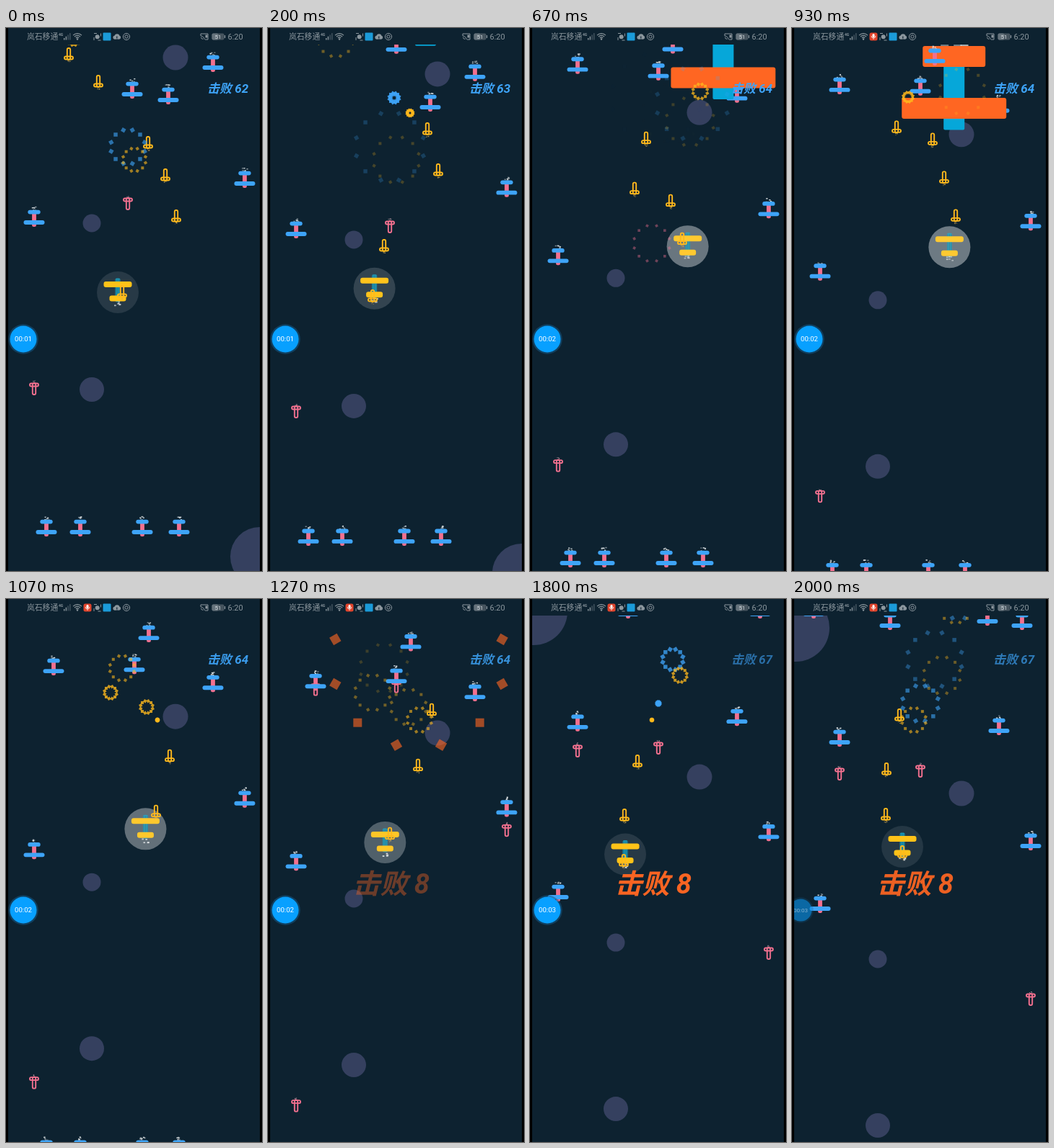
Recreate the animation shown at these times as an HTML page with a canvas. Size 355 by 754 pixels, loop 2.07 s.

```html
<!DOCTYPE html>
<html lang="zh">
<head>
<meta charset="utf-8">
<style>
html, body { margin: 0; width: 100%; height: 100%; overflow: hidden; background: #000; }
canvas { display: block; }
</style>
</head>
<body>
<canvas id="stage" width="355" height="754"></canvas>
<script>
const g = document.getElementById('stage').getContext('2d');
const LOOP = 2070, TOP = 23;
const BG = '#0d2230', BLUE = '#3ea4f8', PINK = '#f2708f', YELLOW = '#ffb91c',
  ORANGE = '#ff6622', CYAN = '#06a7d9', PURPLE = '#35405f', GREY = '#8c979e';
const FONT = 'Roboto, "Noto Sans CJK SC", "Noto Sans CJK", sans-serif';

// Player: time, x, y, shield opacity
const flight = [
  [0, 155, 367, .1], [190, 145, 364, .14], [390, 197, 318, .25], [400, 201, 317, .26],
  [590, 211, 306, .36], [670, 219, 303, .38], [790, 225, 302, .4], [930, 219, 304, .4],
  [990, 208, 309, .38], [1190, 170, 336, .3], [1270, 162, 338, .27], [1390, 149, 345, .22],
  [1600, 131, 355, .14], [1790, 131, 355, .1], [2000, 153, 344, .09]];

// Drifting discs: x, y at start, radius
const discs = [[235, 41, 17.5], [119, 271, 12.5], [119, 502, 17], [352, 734, 41], [5, -189, 47]];

// Enemy planes: x, wing y at start, speed, end time
const early = [
  [39, 270, .08], [331, 216, .0635], [287, 55, .064], [175, 92, .05, 150], [225, 100, .05, 250],
  [56, 700, .0645], [103, 700, .0645], [189, 700, .0645], [240, 700, .0645]];
const late = [
  [66, -13, .106], [178, 14, .079, 1790], [198, -11.5, .0615, 1680],
  [136, -123, .08], [319, -123, .08], [271, -129, .08], [30, -139, .08]];

// Player shots: x, y at start, birth, end
const shots = [
  [87, 37], [128, 75], [197, 160, 0, 150], [221, 205, 0, 250], [236, 262, 0, 540],
  [161, 367, 0, 851], [145, 437, 190, 960], [195, 454, 390, 960], [211, 507, 590, 1055],
  [227, 560, 790, 1720], [208, 637, 990, 1680], [169, 732, 1190, 1790], [149, 802, 1390],
  [131, 877, 1590], [130, 940, 1790], [153, 992, 1990]];

// Enemy shots: x, y at start, speed, birth, end
const darts = [[169, 243, .16, 0, 360], [39, 500, .16], [66, -78, .16, 1190],
  [178, -82, .16, 1190], [331, -85, .32, 1190]];

// Bursts by colour: square size, spread speed, then x, y, start
const bursts = [
  [BLUE, 5.5, .12, [[169, 165, -200], [175, 97, 150], [225, 105, 250],
    [198, 84, 1680], [231, -6, 1720], [178, 145, 1790]]],
  [YELLOW, 4, .08, [[94, 15, -110], [178, 183, -200], [197, 118, 150], [222, 130, 250],
    [236, 88, 540], [161, 96, 851], [145, 130, 960], [195, 150, 960], [210, 168, 1055],
    [208, 106, 1680], [227, 11, 1720], [169, 168, 1790]]],
  [PINK, 3.6, .085, [[169, 299, 370]]],
  [ORANGE, 12, .6, [[209, 87, 1067]]]];

const alive = (t, from = 0, to = Infinity) => t >= from && t < to;

function at(rows, t) {
  const i = rows.findIndex(r => r[0] > t);
  if (i < 0) return rows[rows.length - 1].slice(1);
  if (!i) return rows[0].slice(1);
  const a = rows[i - 1], b = rows[i], p = (t - a[0]) / (b[0] - a[0]);
  return a.slice(1).map((v, j) => v + (b[j + 1] - v) * p);
}

function disc(x, y, r, color) {
  g.fillStyle = color;
  g.beginPath();
  g.arc(x, y, r, 0, 7);
  g.fill();
}

// Rounded bar centred on x, y
function bar(x, y, w, h, color, r = 3) {
  g.fillStyle = color;
  g.beginPath();
  g.roundRect(x - w / 2, y - h / 2, w, h, r);
  g.fill();
}

function text(str, x, y, font, color, align = 'left') {
  g.font = font + ' ' + FONT;
  g.fillStyle = color;
  g.textAlign = align;
  g.fillText(str, x, y);
}

// Flickering propeller
function puff(x, y, s, frame, color = '#dde2e4') {
  let seed = frame * 37 + Math.round(x) * 11 + 5;
  const rnd = () => (seed = (seed * 16807 + 11) % 2147483647) / 2147483647;
  rnd(); rnd();
  g.fillStyle = color;
  for (let i = 0; i < 6; i++) {
    g.globalAlpha = .4 + .6 * rnd();
    g.fillRect(x + (rnd() * 7 - 4.5) * s, y + (rnd() * 5 - 3) * s, 2.2 * s, 1.5 * s);
  }
  g.globalAlpha = 1;
}

function plane(x, y, s, wing, body, frame) {
  puff(x, y - 19.3 * s, s, frame);
  bar(x, y - 5.5 * s, 5.8 * s, 23 * s, body, 2);
  bar(x, y - 14.4 * s, 17.4 * s, 5.8 * s, wing);
  bar(x, y, 29 * s, 5.8 * s, wing);
}

function dart(x, y, dir, color, frame) {
  puff(x, y + 9 * dir, .55, frame, dir > 0 ? '#d8ae55' : '#c9a3ae');
  g.strokeStyle = color;
  g.lineWidth = 1.9;
  g.beginPath();
  g.roundRect(x - 2.2, y - (dir > 0 ? 9 : 7), 4.4, 16, 2);
  g.roundRect(x - 6, y + 4.5 * dir - 2, 12, 4, 2);
  g.stroke();
}

function player(t, frame) {
  const [x, y, a] = at(flight, t);
  disc(x, y, 29, `rgba(255,255,255,${a * .75})`);
  bar(x, y - 3, 7, 33, '#128fb0', 2);
  g.fillStyle = 'rgba(13,34,48,.3)';
  for (let i = -1; i < 2; i++) g.fillRect(x + i * 2.4 - .4, y - 18, .9, 30);
  puff(x, y + 16, 1.2, frame);
  bar(x, y - 11, 39, 8, '#ffc010');
  bar(x, y + 8.5, 23, 8, '#ffc010');
  disc(x, y, 29, `rgba(255,255,255,${a * .35})`);
}

function burst(x, y, age, size, speed, color) {
  if (age < 0 || age > 520) return;
  g.globalAlpha = 1 - age / 520;
  g.fillStyle = color;
  for (let i = 0; i < 12; i++) {
    g.save();
    g.translate(x, y);
    g.rotate((i + .5) * Math.PI / 6);
    g.translate(age * speed, 0);
    g.rotate(Math.PI / 4);
    g.fillRect(-size / 2, -size / 2, size, size);
    g.restore();
  }
  g.globalAlpha = 1;
}

function statusBar(t) {
  text('岚石移通', 29, 16, '10.8px', GREY);
  text('4G', 73, 11, 'bold 5px', GREY);
  for (let i = 0; i < 4; i++) {
    g.globalAlpha = i < 2 ? 1 : .45;
    g.fillStyle = GREY;
    g.fillRect(80 + i * 2.7, 14 - i * 2.3, 1.4, 2.5 + i * 2.3);
  }
  g.globalAlpha = 1;
  g.strokeStyle = GREY;
  g.lineWidth = 1.2;
  for (const r of [3, 5.7, 8.4]) {
    g.beginPath();
    g.arc(99, 16, r, -Math.PI * .75, -Math.PI * .25);
    g.stroke();
  }
  disc(99, 15.5, 1.2, GREY);
  if (t >= 800) {
    bar(113, 12, 11, 11, '#e0442c', 2.5);
    bar(113, 10.5, 3, 5, '#fff', 1.5);
    g.strokeStyle = '#fff';
    g.lineWidth = .8;
    g.beginPath();
    g.arc(113, 11, 2.9, 0, Math.PI);
    g.moveTo(113, 14);
    g.lineTo(113, 16);
    g.stroke();
  }
  g.strokeStyle = GREY;
  g.lineWidth = 1;
  g.setLineDash([4, 5.5]);
  g.strokeRect(122, 7.5, 9.5, 9.5);
  g.setLineDash([]);
  disc(126.7, 12.2, 3, GREY);
  bar(140, 12, 11, 11, '#1b9bd9', 1);
  disc(151, 13, 2.6, GREY);
  disc(154, 11.5, 3.3, GREY);
  disc(156.6, 13, 2.5, GREY);
  bar(153.8, 14.2, 8, 2.8, GREY, 1.4);
  bar(153.8, 13, 1.2, 3, BG, 0);
  g.beginPath();
  g.arc(167, 12, 4.6, 0, 7);
  g.moveTo(169.2, 12);
  g.arc(167, 12, 2.2, 0, 7);
  g.stroke();
  // Cast, battery, clock
  g.beginPath();
  g.moveTo(270, 11);
  g.lineTo(270, 8);
  g.lineTo(280, 8);
  g.lineTo(280, 16);
  g.lineTo(276, 16);
  for (const r of [2.5, 5]) {
    g.moveTo(270, 16 - r);
    g.arc(270, 16, r, -Math.PI / 2, 0);
  }
  g.stroke();
  bar(278, 11.5, 3, 4, GREY, 0);
  bar(294, 12, 17, 9, '#46545e', 2);
  bar(290, 12, 9, 9, '#65727b', 2);
  bar(303.5, 12, 1.3, 4, GREY, .5);
  text('51', 294, 15, '8px', '#d4dade', 'center');
  text('6:20', 307.5, 16, '11px', GREY);
}

function timer(t) {
  const [x, r, a] = at([[1800, 24, 18.5, 1], [2000, 12, 15.5, .5]], t);
  const s = t < 530 ? 1 : t < 1530 ? 2 : 3;
  g.globalAlpha = a;
  disc(x, 432, r + 2.2, 'rgba(20,90,135,.55)');
  disc(x, 432, r, '#08a0ff');
  text('00:0' + s, x, 435.4, `${9.6 * r / 18.5}px`, '#fff', 'center');
  g.globalAlpha = 1;
}

function draw(t, frame) {
  g.fillStyle = '#000';
  g.fillRect(0, 0, 355, 754);
  g.fillStyle = BG;
  g.fillRect(3, 0, 349, 754);
  statusBar(t);

  g.save();
  g.beginPath();
  g.rect(3, TOP, 349, 754 - TOP);
  g.clip();
  for (const [x, y, r] of discs) disc(x, y + .1145 * t, r, PURPLE);
  for (const [x, y, v, from, to] of darts)
    if (alive(t, from, to)) dart(x, y + v * t, -1, PINK, frame);
  const fly = ([x, y, v, to]) => alive(t, 0, to) && plane(x, y + v * t, 1, BLUE, PINK, frame);
  early.forEach(fly);
  if (t < 1060) plane(281 - .162 * Math.abs(t - 586), -37 + .159 * t, 5, ORANGE, CYAN, frame);
  late.forEach(fly);
  player(t, frame);
  for (const [x, y, from, to] of shots)
    if (alive(t, from, to)) dart(x, y - .32 * t, 1, YELLOW, frame);
  for (const [color, size, speed, list] of bursts)
    for (const [x, y, from] of list) burst(x, y, t - from, size, speed, color);

  const score = 62 + [150, 250, 1680, 1720, 1790].filter(k => t >= k).length;
  [g.globalAlpha] = at([[0, 1], [930, 1], [1270, .85], [1600, .52], [2000, .68]], t);
  text('击败 ' + score, 279, 90, 'italic bold 17px', BLUE);
  [g.globalAlpha] = at([[1067, 0], [1270, .4], [1520, 1], [1700, 1], [2000, .92]], t);
  text('击败 8', 117.5, 409, 'italic bold 38px', ORANGE);
  g.globalAlpha = 1;
  timer(t);
  g.restore();
}

// The picture advances 15 times a second
const start = performance.now();
function tick() {
  const t = (performance.now() - start) % LOOP, r = t % 200;
  const frame = Math.floor(t / 200) * 3 + (r >= 130 ? 2 : r >= 70 ? 1 : 0);
  draw(frame * 200 / 3, frame);
  requestAnimationFrame(tick);
}
tick();
</script>
</body>
</html>
```
